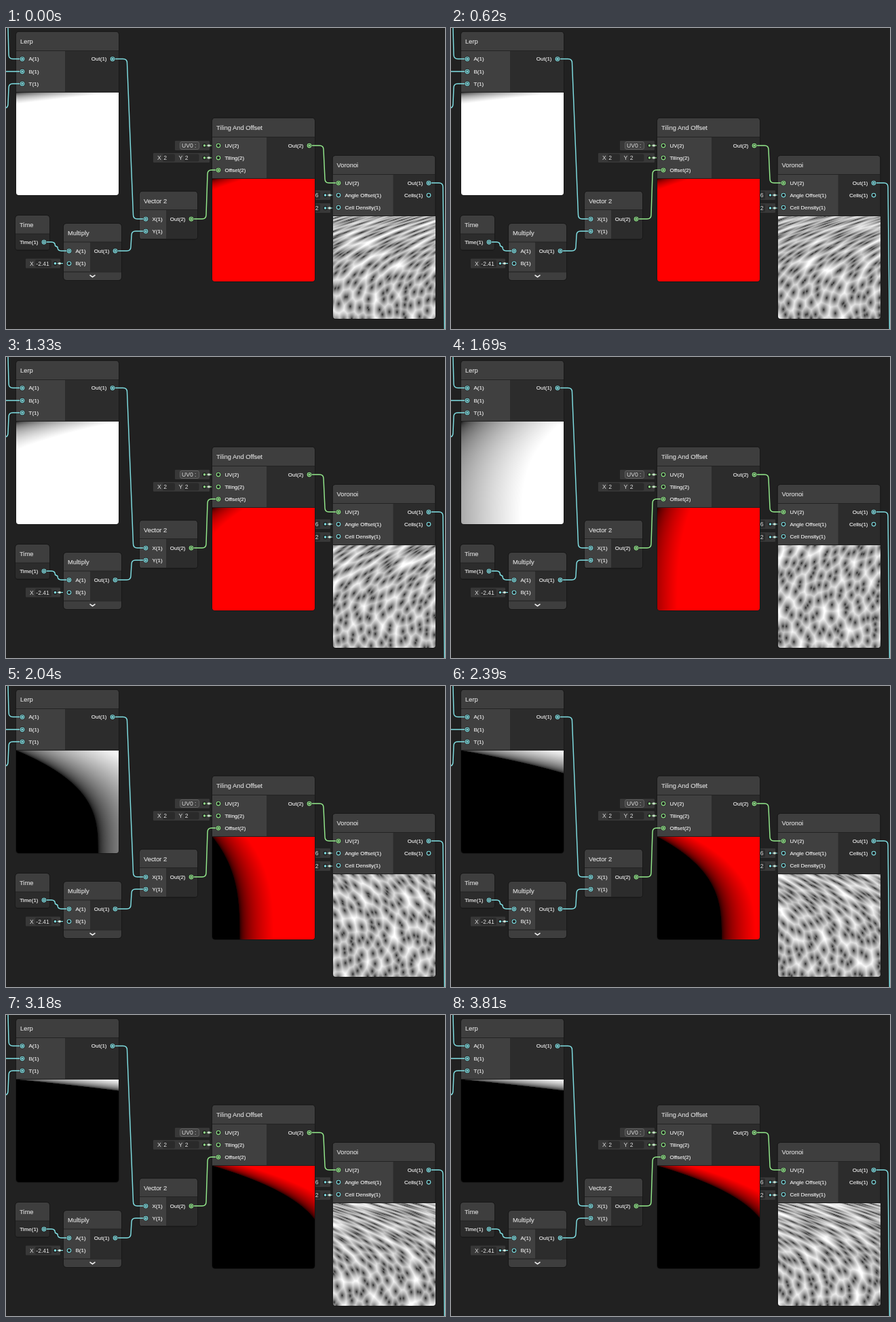
These frames come from a looping animation (647 by 443 pixels, 3910 ms). An HTML page with a canvas:

```html
<!DOCTYPE html>
<html lang="en">
<head>
<meta charset="utf-8">
<title>Shader graph</title>
<style>
  html, body { margin: 0; width: 100%; height: 100%; overflow: hidden; background: #212121; }
  svg { position: absolute; left: 0; top: 0; }
  canvas { position: absolute; border-radius: 0 0 4px 4px; }
  text { font: 8px "Liberation Sans", Arial, sans-serif; fill: #f0f0f0; stroke: #f0f0f0; stroke-width: .15px; }
  .title { font-size: 9.33px; fill: #dcdcdc; stroke: #dcdcdc; }
  .value { font-size: 8.6px; fill: #dcdcdc; stroke: none; }
  .end { text-anchor: end; }
</style>
</head>
<body>
<svg id="graph" width="647" height="443" viewBox="0 0 647 443"></svg>
<script>
const CYAN = '#80dfe3', GREEN = '#94ea8c';
const WIRE_WIDTH = 1.45;
const LOOP = 3910, STEP = 88.3, LAST_STEP = 43;
const SIZE = 151;

// ---------- static graph ----------
const rect = (x, y, w, h, fill, extra = '') =>
  `<rect x="${x}" y="${y}" width="${w}" height="${h}" fill="${fill}" ${extra}/>`;
const label = (x, y, text, cls = '') => `<text x="${x}" y="${y}" class="${cls}">${text}</text>`;
const dot = (x, y, r, fill, extra = '') => `<circle cx="${x}" cy="${y}" r="${r}" fill="${fill}" ${extra}/>`;
const stroke = (d, color, width = WIRE_WIDTH) =>
  `<path d="${d}" fill="none" stroke="${color}" stroke-width="${width}"/>`;

// Two horizontal runs joined by a steep middle part with rounded corners.
function wire(color, x1, y1, xa, xb, x2, y2) {
  const r = Math.min(6, Math.abs(y2 - y1) / 2 - 1);
  const s = Math.sign(y2 - y1) * r;
  return stroke(`M${x1} ${y1}H${xa - r}Q${xa} ${y1} ${xa} ${y1 + s}L${xb} ${y2 - s}` +
    `Q${xb} ${y2} ${xb + r} ${y2}H${x2}`, color);
}

function port(x, y, color, connected) {
  return dot(x, y, 4, '#232323') +
    dot(x, y, 2.8, '#232323', `stroke="${color}" stroke-width="1.15"`) +
    (connected ? dot(x, y, 1.6, color) : '');
}

const input = (x, y, text, color, connected = true) =>
  port(x, y, color, connected) + label(x + 9.5, y + 2.8, text);
const output = (x, y, text, color, connected = true) =>
  port(x, y, color, connected) + label(x - 8.5, y + 2.8, text, 'end');

// split: x where the input column ends; foot: height of the strip below the ports
function node(title, x, y, w, h, head, body, split, foot = 0) {
  const clip = 'clip' + x;
  return `<clipPath id="${clip}"><rect x="${x}" y="${y}" width="${w}" height="${h}" rx="4"/></clipPath>` +
    `<g clip-path="url(#${clip})">` +
    rect(x, y, w, h, '#3e3e3e') +
    rect(x, y + head, w, body, '#2c2c2c') +
    rect(x, y + head, split - x, body, '#404040') +
    rect(x, y + head - 0.5, w, 1, '#232323') +
    rect(x, y + head + body - (foot ? 0 : 1), w, 1, '#202020') + '</g>' +
    rect(x - 0.5, y - 0.5, w + 1, h + 1, 'none', 'rx="4.5" stroke="#181818"') +
    label(x + 6, y + 17.3, title, 'title');
}

function field(x, y, w, color, portX, content) {
  const plug = x + w - 7.5;
  return rect(x, y - 7, w, 14, '#383838', 'rx="1"') + content +
    stroke(`M${plug} ${y}H${portX - 3}`, color, 1.2) +
    dot(plug, y, 3.2, '#222') + dot(plug, y, 1.7, color) +
    rect(plug + 5, y - 1.5, 3, 3, '#d8e8d8');
}
const number = (x, y, w, text) =>
  rect(x, y - 5.5, w, 11, '#2a2a2a', 'rx="2"') + label(x + 1.3, y + 3, text, 'value');

document.getElementById('graph').innerHTML =
  rect(0, 0, 647, 443, '#212121') +
  // value fields
  field(249, 173, 51, GREEN, 313,
    rect(256.5, 167.5, 28, 11, '#424242', 'rx="2.5" stroke="#6a6a6a" stroke-width=".8"') +
    label(259, 176, 'UV0 :', 'value')) +
  field(217, 191, 83, GREEN, 313,
    label(223, 194, 'X', 'value') + number(231, 191, 18, '2') +
    label(254.5, 194, 'Y', 'value') + number(262.5, 191, 22, '2')) +
  field(29, 346.5, 51, CYAN, 93,
    label(35, 349.5, 'X', 'value') + number(43, 346.5, 24, '-2.41')) +
  field(436, 246, 42, CYAN, 490, number(440, 246, 23, '') + label(455.7, 249, '6', 'value')) +
  field(436, 265, 42, CYAN, 490, number(440, 265, 23, '') + label(455.7, 268, '2', 'value')) +
  // nodes
  node('Lerp', 15, 5.5, 151, 240.5, 28, 61.5, 87) +
  node('Tiling And Offset', 304, 132.5, 151, 240.5, 28, 61.5, 384) +
  node('Voronoi', 481.5, 188, 151, 240, 27.5, 61.5, 570.5) +
  node('Vector 2', 197, 240.5, 85, 70.5, 27, 43.5, 236) +
  node('Time', 14, 276, 50, 51, 27, 24, 14) +
  node('Multiply', 85, 288, 85, 83, 27, 43.5, 124, 12) +
  stroke('M123.5 363.7L127.5 366.5L131.5 363.7', '#eee', 1.6) +
  // wires
  stroke('M3 0L4 39Q4 45.5 10 45.5H24M0 64H24', CYAN) +
  wire(CYAN, -4, 118, 3, 4, 24, 82) +
  wire(CYAN, 157, 45.5, 178.5, 187.5, 206, 281) +
  wire(CYAN, 56, 315, 72.5, 76, 93, 328) +
  wire(CYAN, 161, 328, 184, 185, 206, 299) +
  wire(GREEN, 273, 281, 295, 297, 313, 209) +
  wire(GREEN, 447, 173, 468, 470, 490, 228) +
  wire(CYAN, 623, 228, 644, 646.5, 660, 460) +
  // ports
  input(24, 45.5, 'A(1)', CYAN) + input(24, 64, 'B(1)', CYAN) + input(24, 82, 'T(1)', CYAN) +
  output(157, 45.5, 'Out(1)', CYAN) +
  input(313, 173, 'UV(2)', GREEN, false) + input(313, 191, 'Tiling(2)', GREEN, false) +
  input(313, 209, 'Offset(2)', GREEN) + output(447, 173, 'Out(2)', GREEN) +
  input(490, 228, 'UV(2)', GREEN) + input(490, 246, 'Angle Offset(1)', CYAN, false) +
  input(490, 264, 'Cell Density(1)', CYAN, false) +
  output(623, 228, 'Out(1)', CYAN) + output(623, 246, 'Cells(1)', CYAN, false) +
  input(206, 281, 'X(1)', CYAN) + input(206, 299, 'Y(1)', CYAN) + output(273, 281, 'Out(2)', GREEN) +
  output(56, 315, 'Time(1)', CYAN) +
  input(93, 328, 'A(1)', CYAN) + input(93, 346.5, 'B(1)', CYAN, false) + output(161, 328, 'Out(1)', CYAN);

// ---------- live previews ----------
function preview(x, y) {
  const canvas = document.createElement('canvas');
  canvas.width = canvas.height = SIZE;
  canvas.style.left = x + 'px';
  canvas.style.top = y + 'px';
  document.body.append(canvas);
  const context = canvas.getContext('2d');
  const image = context.createImageData(SIZE, SIZE);
  image.data.fill(255);
  return { data: image.data, show: () => context.putImageData(image, 0, 0) };
}
const lerpView = preview(15, 95), tilingView = preview(304, 222), voronoiView = preview(481.5, 277);

const ANGLE_OFFSET = 5.56, CELL_DENSITY = 4.62;
const fract = n => n - Math.floor(n);
const toByte = value => 255 * Math.pow(Math.min(1, Math.max(0, value)), 1 / 2.2);

const seeds = new Map();
function cellSeed(i, j) {
  const key = i * 4096 + j;
  let seed = seeds.get(key);
  if (!seed) {
    const a = fract(Math.sin(i * 15.27 + j * 99.41) * 46839.32);
    const b = fract(Math.sin(i * 47.63 + j * 89.98) * 46839.32);
    seed = [i + Math.sin(b * ANGLE_OFFSET) / 2 + 0.5, j + Math.cos(a * ANGLE_OFFSET) / 2 + 0.5];
    seeds.set(key, seed);
  }
  return seed;
}

function voronoi(x, y) {
  x *= CELL_DENSITY;
  y *= CELL_DENSITY;
  const ci = Math.floor(x), cj = Math.floor(y);
  let nearest = 64;
  for (let i = ci - 1; i <= ci + 1; i++) {
    for (let j = cj - 1; j <= cj + 1; j++) {
      const [sx, sy] = cellSeed(i, j);
      nearest = Math.min(nearest, (sx - x) ** 2 + (sy - y) ** 2);
    }
  }
  return Math.sqrt(nearest);
}

function drawPreviews(seconds) {
  const time = -1.9 + 1.13 * seconds - 0.04 * seconds * seconds;
  const bend = 3.5 * Math.sin(time);
  const scroll = -2.41 * (time + 4 * Math.PI);
  for (let row = 0, p = 0; row < SIZE; row++) {
    const v = 1 - (row + 0.5) / SIZE;
    for (let col = 0; col < SIZE; col++, p += 4) {
      const u = (col + 0.5) / SIZE;
      const lerp = u - bend * (1 - v ** 3);
      const x = 2 * u + lerp;
      lerpView.data.fill(toByte(lerp), p, p + 3);
      tilingView.data[p] = toByte(x);
      tilingView.data[p + 1] = tilingView.data[p + 2] = 0;
      voronoiView.data.fill(toByte(voronoi(x, 2 * v + scroll)), p, p + 3);
    }
  }
  lerpView.show();
  tilingView.show();
  voronoiView.show();
}

const start = performance.now();
let shown = -1;
function tick() {
  const elapsed = (performance.now() - start) % LOOP;
  const step = Math.min(LAST_STEP, Math.floor(elapsed / STEP));
  if (step !== shown) {
    shown = step;
    drawPreviews(step * STEP / 1000);
  }
  requestAnimationFrame(tick);
}
tick();
</script>
</body>
</html>
```
